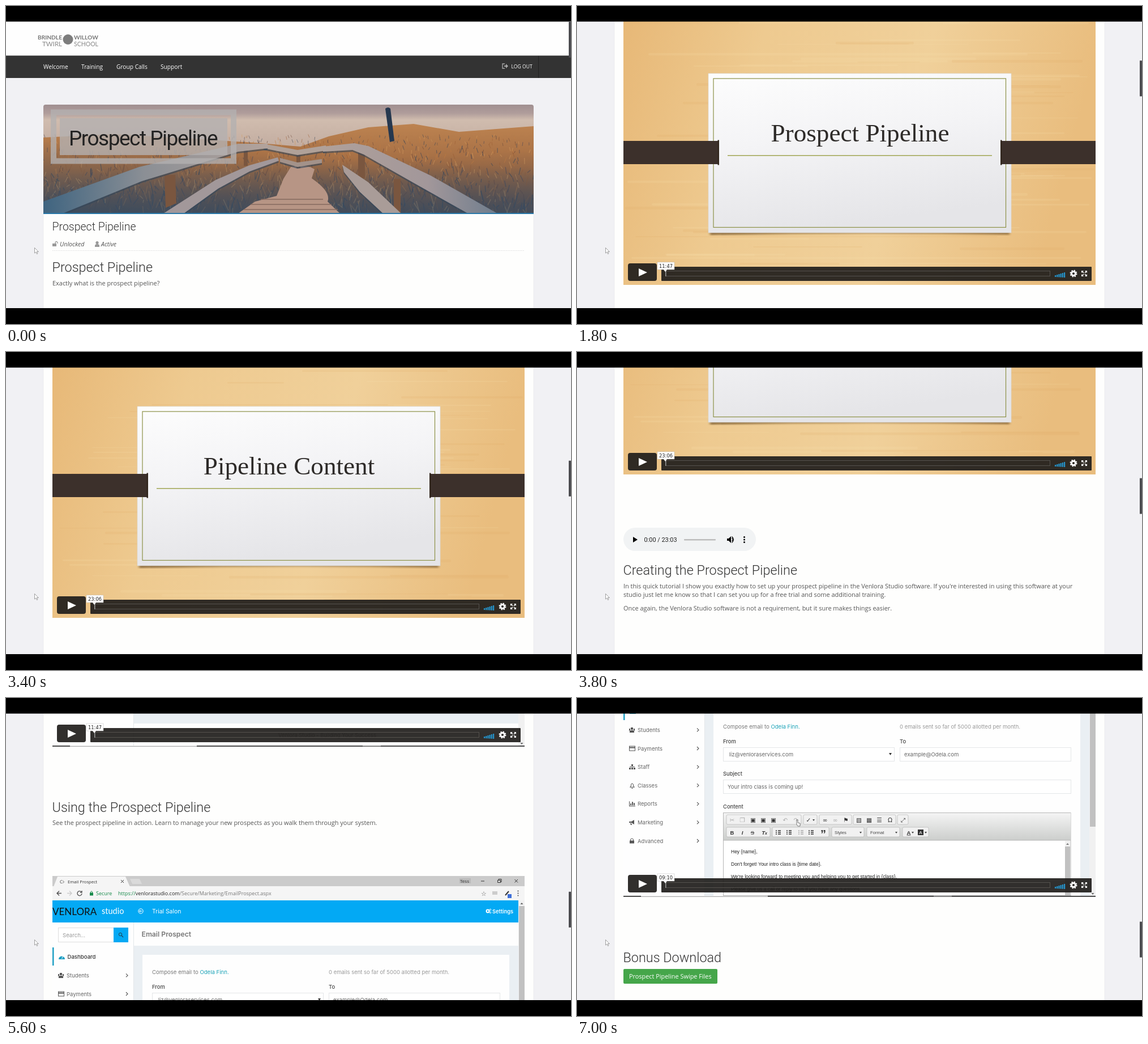
Recreate the animation shown at these times as an HTML page. Size 998 by 561 pixels, loop 7200 ms.

```html
<!DOCTYPE html>
<html lang="en">
<head>
<meta charset="utf-8">
<title>Course page scroll</title>
<style>
html, body { margin: 0; width: 100%; height: 100%; overflow: hidden; background: #000; }
svg { display: block; position: absolute; left: 0; top: 0; }
text { white-space: pre; }
</style>
</head>
<body>
<svg id="stage" width="998" height="561" viewBox="0 0 998 561"></svg>
<script>
const LOOP = 7200, STEP = 200;
const BODY = 'Open Sans', HEAD = 'Roboto', APP = 'Inter', SYMBOL = 'DejaVu Sans';

let seed = 7;
const random = (a, b) => {
  seed = (seed * 16807) % 2147483647;
  return a + (b - a) * seed / 2147483647;
};
const pick = list => list[Math.floor(random(0, list.length))];
const repeat = (n, make) => Array.from({ length: n }, (_, i) => make(i)).join('');

// SVG helpers
const rect = (x, y, w, h, fill, more = '') =>
  `<rect x="${x}" y="${y}" width="${w}" height="${h}" fill="${fill}" ${more}/>`;
const text = (x, y, str, size, fill, font = BODY, more = '') =>
  `<text x="${x}" y="${y}" font-size="${size}" fill="${fill}" font-family="${font}, sans-serif" ${more}>${str}</text>`;
const shape = (d, fill, more = '') => `<path d="${d}" fill="${fill}" ${more}/>`;
const line = (d, stroke, width = 1, more = '') =>
  `<path d="${d}" fill="none" stroke="${stroke}" stroke-width="${width}" ${more}/>`;
const circle = (x, y, r, fill, more = '') => `<circle cx="${x}" cy="${y}" r="${r}" fill="${fill}" ${more}/>`;
const at = (x, y, content) => `<g transform="translate(${x} ${y})">${content}</g>`;
const gradient = (id, stops, dir = 'x2="0" y2="1"') =>
  `<linearGradient id="${id}" ${dir}>${stops.map(([o, c]) => `<stop offset="${o}" stop-color="${c}"/>`).join('')}</linearGradient>`;

const heading = (y, str, size = 23.4) => text(81.5, y, str, size, '#333', HEAD, 'font-weight="300"');
const para = (y, str) => text(82, y, str, 10.95, '#555');

const defs = `<defs>
  ${gradient('sky', [[0, '#a08f90'], [.08, '#b09d9b'], [.14, '#d0bcae'], [.4, '#c2aca0'], [1, '#a88a78']])}
  ${gradient('grass', [[0, '#bd8350'], [.5, '#a06a42'], [1, '#6f4e40']])}
  ${gradient('shade', [[0, '#274c6b'], [1, '#274c6b00']], 'x1="0" y1="1" x2=".35" y2=".1"')}
  ${gradient('shadeRight', [[0, '#2d4a66'], [1, '#2d4a6600']], 'x1="1" y1="1" x2=".75" y2=".2"')}
  ${gradient('rail', [[0, '#3f6480'], [.45, '#8b8f95'], [1, '#b3a39c']], 'x2="1" y2="0"')}
  ${gradient('railRight', [[0, '#b0a19a'], [.6, '#a2979a'], [1, '#6f7d8d']], 'x2="1" y2="0"')}
  ${gradient('wood', [[0, '#e7b877'], [.3, '#eeca90'], [.65, '#f0d09a'], [1, '#e9bd7e']], 'x2="1" y2=".15"')}
  ${gradient('card', [[0, '#fdfdfd'], [.45, '#f4f4f6'], [1, '#e5e5e8']], 'x2=".25" y2="1"')}
  ${gradient('toolbar', [[0, '#f4f4f4'], [1, '#cccecc']])}
  <clipPath id="photoClip"><path d="M66 366V178q0-4 4-4H928q4 0 4 4V366Z"/></clipPath>
  <filter id="blur"><feGaussianBlur stdDeviation="2"/></filter>
</defs>`;

function photo() {
  const blades = repeat(1500, () => {
    const x = random(66, 932), y = random(232, 374), size = (y - 190) / 90;
    const tone = pick(['#d39a5e', '#9c5f36', '#4f4a55', '#c07c42', '#6f4b3c', '#3d4757']);
    return line(`M${x | 0} ${y | 0}l${random(-5 * size, 5 * size).toFixed(1)} ${random(-12 * size, -4).toFixed(1)}`,
      tone, (.6 + size * .6).toFixed(1), 'opacity=".6"');
  });
  const rail = (d, fill) => shape(d, '#33475a', 'transform="translate(0 3)" opacity=".6"') + shape(d, fill);
  return `<g clip-path="url(#photoClip)">` +
    rect(66, 174, 866, 192, 'url(#sky)') +
    shape('M66 232L190 226 330 234 450 242 520 248 570 230 640 214 720 208 800 222 932 212V366H66Z', 'url(#grass)') +
    blades +
    rect(66, 240, 866, 126, 'url(#shade)', 'opacity=".6"') +
    rect(66, 240, 866, 126, 'url(#shadeRight)', 'opacity=".45"') +
    shape('M503 284Q530 278 545 288L540 304Q575 328 568 345L590 366H410L440 345 478 335 490 305Z', '#b79585') +
    line('M432 350H575M420 359H586M450 341H560', '#85695f', 1.5) +
    shape('M670 181q5-4 9 0L686 238 678 240Z', '#26384f') +
    shape('M280 298H299L301 348 282 356ZM420 246H427V282H420ZM513 256H520V286H513ZM622 252H634V304H622ZM685 305H697V366H685Z', '#7a563f') +
    rail('M484 268L515 276 558 270V277L515 284 484 275Z', '#a3928a') +
    rail('M455 243L515 254 565 246V255L515 263 455 251Z', '#b0a199') +
    rail('M278 366L370 307 430 281 480 267 482 273 430 292 375 322 314 366Z', '#a2989a') +
    rail('M594 280L640 311 698 366H666L625 328 597 293Z', '#a99c98') +
    rail('M66 345L235 284 410 243H462V251L410 257 240 309 100 366H66Z', 'url(#rail)') +
    rail('M560 248L615 242 640 247 750 299 868 366H816L720 312 632 262 612 254 560 257Z', 'url(#railRight)') +
    rect(84, 187.5, 318, 86, 'none', 'stroke="#b4b1b1" stroke-opacity=".78" stroke-width="10"') +
    rect(95, 198, 296, 65, '#b4b1b1', 'opacity=".8"') +
    text(111, 246, 'Prospect Pipeline', 37, '#222', HEAD, 'letter-spacing="-1.5"') +
    `</g>` + rect(66, 365, 866, 2, '#2a78a8');
}

function header() {
  return rect(0, 27, 998, 61, '#fefefe') +
    circle(109.5, 59, 9, '#7d7d7d') +
    text(99, 58.5, 'BRINDLE', 10.2, '#777', 'Lato', 'font-weight="700" text-anchor="end"') +
    text(120, 58.5, 'WILLOW', 10.2, '#777', 'Lato', 'font-weight="700"') +
    text(99, 70.5, 'TWIRL', 11.5, '#888', 'Lato', 'text-anchor="end"') + text(120, 70.5, 'SCHOOL', 10.5, '#888', 'Lato') +
    rect(0, 87.5, 998, 39.5, '#333') + rect(940, 88, 1, 39, '#222') +
    [[66, 'Welcome'], [133, 'Training'], [195, 'Group Calls'], [273, 'Support']]
      .map(([x, s]) => text(x, 111, s, 10.2, '#fff')).join('') +
    line('M881 102h-4v8h4', '#aaa', 1.3) + shape('M880 105h3v-3l4 4-4 4v-3h-3Z', '#aaa') +
    text(892.5, 110, 'LOG OUT', 8.6, '#fff');
}

function status() {
  return heading(396, 'Prospect Pipeline', 19.5) +
    rect(82, 419, 7, 5, '#999') + line('M87 419v-2q2-3 4 0v2', '#999', 1.3) +
    text(95, 423.5, 'Unlocked', 10.7, '#555', BODY, 'font-style="italic"') +
    circle(161, 417.5, 2.6, '#999') + shape('M157 425v-2q0-3 4-3t4 3v2Z', '#999') +
    text(168, 423.5, 'Active', 10.7, '#555', BODY, 'font-style="italic"') +
    line('M82 431.5H916', '#e4e4e4', 1, 'stroke-dasharray="2 1"');
}

// Player bar, drawn relative to the bottom of its video
function controls(bottom, time) {
  const dark = 'rgba(32,30,28,.92)';
  return at(0, bottom,
    rect(90, -38, 51, 31, dark, 'rx="4"') + shape('M109-29L124-22 109-15Z', '#fff') +
    rect(149, -32, 760, 25, dark, 'rx="1"') + rect(156.5, -24.5, 679, 9, 'none', 'stroke="#55524e"') +
    rect(156, -25, 1.5, 10, '#999') +
    rect(142, -40, 30, 13, '#fff', 'stroke="#bbb" stroke-width=".5"') + shape('M153-27h6l-3 4Z', '#fff') +
    text(157, -30.5, time, 8.3, '#222', SYMBOL, 'text-anchor="middle"') +
    repeat(6, i => rect(844 + i * 3.2, -17 - i, 2.2, 3 + i * 1.2, '#2496cf')) +
    circle(877, -20, 3.6, 'none', 'stroke="#fff" stroke-width="3"') +
    circle(877, -20, 5.5, 'none', 'stroke="#fff" stroke-width="2" stroke-dasharray="2.3 2.02"') +
    shape('M891-25h4l-4 4ZM901-25v4l-4-4ZM891-15v-4l4 4ZM901-15h-4l4-4Z', '#fff') +
    line('M892-24l3 3M900-24l-3 3M892-16l3-3M900-16l-3-3', '#fff', 1.5));
}

function slide(top, title, time) {
  const grain = repeat(70, () => {
    const x = random(82, 720), w = random(100, 916 - x);
    return rect(x | 0, random(0, 464) | 0, w | 0, random(1, 5).toFixed(1),
      pick(['#dca55c', '#f7deb2']), 'opacity=".14" rx="2"');
  });
  const strap = (x, edge) => rect(x, 215, 168, 41, '#3c302b') + rect(edge, 213.5, 2.5, 44, '#33281f');
  return at(0, top,
    rect(82, 0, 834, 469, 'url(#wood)') + grain +
    shape('M235 372H764V380Q500 374 235 381Z', '#5b3d18', 'opacity=".7" filter="url(#blur)"') +
    rect(232, 96, 535, 281, 'url(#card)', 'stroke="#d9d6d0" stroke-width=".7"') +
    rect(241, 105, 516.5, 262.5, 'none', 'stroke="#8c9146" stroke-width="1.2"') +
    strap(82, 248.5) + strap(748, 748) +
    text(500, 216, title, 45.2, '#2d2a28', 'Liberation Serif', 'text-anchor="middle"').replace('sans-serif', 'serif') +
    rect(266, 240, 467, 1.5, '#a0a552')) + controls(top + 469, time);
}

function audio(y, length) {
  return at(0, y,
    rect(82, 0, 234, 41, '#f1f3f4', 'rx="20.5"') + shape('M99 16L107 21 99 26Z', '#000') +
    text(118.5, 24.7, '0:00 / ' + length, 10.9, '#222', HEAD) + rect(189, 20, 56, 2.4, '#bdbdbd', 'rx="1"') +
    shape('M265 19h3l4-4v12l-4-4h-3Z', '#000') + line('M273.500 18q3 3 0 6M273.500 15.500q6 5.500 0 11', '#000', 1.2) +
    [16.5, 21, 25.5].map(cy => circle(295.5, cy, 1.5, '#000')).join(''));
}

const MENU = [
  ['Students', 'M1 9v-4h8v4ZM3 0h4v4H3ZM0 2h2v4H0ZM8 2h2v4H8Z'],
  ['Payments', 'M0 0h11v9H0ZM1 1v1h9V1ZM1 4v4h9V4Z'],
  ['Staff', 'M4 0h3v3H4ZM0 6h3v3H0ZM4 6h3v3H4ZM8 6h3v3H8ZM5 3h1v3H5ZM1 4h9v1H1Z'],
  ['Classes', 'M1 8L3 5V3Q5-2 8 3V5L10 8ZM3 7H8L7 5V3Q5 0 4 3V5ZM4 9h3v1H4Z'],
  ['Reports', 'M0 0h1v8h10v1H0ZM2 4h2v3H2ZM5 1h2v6H5ZM8 3h2v4H8Z'],
  ['Marketing', 'M0 3h4l5-3v8l-5-3H0ZM2 6h2l1 3H3Z'],
  ['Advanced', 'M1 4h1V2Q5-2 8 2v2h1v5H1ZM3 4h4V2Q5 0 3 2Z']];

function emailForm() {
  const field = (x, y, w, str) => rect(x + .5, y + .5, w, 24, '#fff', 'stroke="#e4e6e8"') + text(x + 8, y + 16, str, 9.6, '#666', APP);
  const label = (x, y, str) => text(x, y, str, 9.4, '#444', APP, 'font-weight="500"');
  const group = (x, y, w) => rect(x, y, w, 17, '#f1f1f1', 'stroke="#b5b5b5" stroke-width=".7" rx="2"');
  const icons = [...'✂❐▣▣▣↶↷✓∞∞⚑▧▦☰Ω⤢'];
  const iconX = [274, 292, 311, 329, 347, 368, 387, 409, 438, 456, 475, 498, 516, 534, 553, 576];
  const faint = [0, 1, 5, 6, 9];
  const mark = (x, str, more = '') => text(x, 359.5, str, 9.5, '#333', 'Liberation Sans', 'text-anchor="middle" ' + more);
  const list = (x, color) => line(`M${x - 4} 353h2M${x - 4} 356h2M${x - 4} 359h2M${x} 353h5M${x} 356h5M${x} 359h5`, color, 1.4);
  const letter = (y, str) => text(272, y, str, 8.5, '#222', 'Liberation Sans');
  return text(258, 173, 'Compose email to <tspan fill="#1ba3b8">Odela Finn.</tspan>', 9.6, '#777', APP) +
    text(570, 173, '0 emails sent so far of 5000 allotted per month.', 9.5, '#999', APP) +
    label(258, 198.5, 'From') + label(570, 198.5, 'To') +
    field(258, 206, 302, ' liz@venloraservices.com') + shape('M551 216h5l-2.500 4Z', '#333') +
    field(570, 206, 302, 'example@Odela.com') +
    label(258, 256, 'Subject') + field(258, 263, 614, 'Your intro class is coming up!') +
    label(258, 314, 'Content') +
    rect(258.5, 321.5, 613.5, 146, '#fff', 'stroke="#b6b6b6"') + rect(259, 322, 613, 48, 'url(#toolbar)') +
    rect(258, 369.5, 614, 1, '#b6b6b6') +
    [[264, 132], [400, 24], [428, 57], [488, 75], [566, 19]].map(([x, w]) => group(x, 325, w)).join('') +
    [[264, 77], [345, 100], [450, 57], [512, 58], [575, 46]].map(([x, w]) => group(x, 347, w)).join('') +
    icons.map((c, i) => text(iconX[i], 337.5, c, 10.5, faint.includes(i) ? '#aaa' : '#333', SYMBOL, 'text-anchor="middle"')).join('') +
    mark(274, 'B', 'font-weight="700"') + mark(292, 'I', 'font-style="italic" font-weight="700"') +
    mark(310, 'S', 'text-decoration="line-through"') + mark(331, 'T<tspan font-size="7">x</tspan>', 'font-style="italic" font-weight="700"') +
    list(355, '#333') + list(374, '#333') + list(395, '#aaa') + list(413, '#333') +
    text(435, 366, '”', 20, '#333', 'Liberation Sans', 'text-anchor="middle" font-weight="700"') +
    text(455, 359, 'Styles', 7.7, '#444', 'Liberation Sans') + text(518, 359, 'Format', 7.7, '#444', 'Liberation Sans') +
    mark(586, 'A', 'font-weight="700" text-decoration="underline"') + rect(602, 351, 10, 10, '#333') +
    text(607, 359, 'A', 8, '#fff', 'Liberation Sans', 'text-anchor="middle"') +
    [[416, 333], [499, 355], [562, 355], [591, 355], [614, 355]].map(([x, y]) => shape(`M${x} ${y}h4l-2 3Z`, '#444')).join('') +
    shape('M388 334v8l2 3h4v-5l-4-1v-5Z', '#fff', 'stroke="#444" stroke-width=".7"') +
    letter(393, 'Hey {name},') + letter(415, `Don't forget! Your intro class is {time date}.`) +
    letter(437, `We're looking forward to meeting you and helping you to get started in {class}.`) +
    letter(459, 'Please give us a call or reply to us if you have any questions.') +
    rect(862, 371, 9, 97, '#f1f1f1') + rect(862, 381, 9, 87, '#c1c1c1') + shape('M864 378h5l-2.500-3Z', '#777');
}

function pipelineBoard() {
  return repeat(4, i => at(258 + i * 156, 160,
    rect(0, 0, 142, 22, '#03a9f4') + text(8, 15, ['New', 'Contacted', 'Intro Class', 'Enrolled'][i], 9.4, '#fff', APP) +
    repeat(4 - i, k => rect(.5, 30.5 + k * 42, 141, 34, '#fff', 'stroke="#e0e4e7"') + text(8, 51 + k * 42, 'Prospect ' + (k + 1), 9.4, '#777', APP)))) +
    rect(226, 380, 679, 50, '#eaeff3') + rect(226, 429, 679, 40, '#fefefe') +
    text(481, 453, 'Venlora Studio - Building Your Success', 9.4, '#888', APP);
}

// Screen recording of a browser window
function browser(top, title, path, content, time) {
  const menu = MENU.map(([name, icon], i) => at(0, 175.4 + i * 32.6,
    at(92, -4.5, shape(icon, '#555', 'fill-rule="evenodd"')) + text(107, 3.5, name, 9.5, '#666', APP) +
    line('M212-3l3 3-3 3', '#555', 1.1))).join('');
  return at(0, top,
    rect(82, 0, 834, 469, '#fefefe') + rect(82, 0, 834, 19, '#cbcbcb') +
    shape('M84 19L91 1H211L219 19Z', '#f5f5f5') + shape('M219 5h17l4 9h-17Z', '#dadada') +
    text(95, 12.5, 'C⊦', 7.5, '#444', SYMBOL) + text(109, 12.5, title, 7.6, '#333', BODY) +
    line('M203 7l5 5M208 7l-5 5M839 9h6M868.500 7.500h5v4h-5ZM870 7V5.500h5v5h-1M898.500 6l5.500 5.500M904 6l-5.500 5.500', '#333') +
    rect(801, 4, 20, 9, '#bbb') + text(802, 12, 'Tess', 8, '#333', BODY) +
    rect(82, 18, 834, 25, '#f5f5f5') +
    line('M98 30.500H90M94 26.500l-4 4 4 4M133 28a4 4 0 1 0 1 3M134 26v3h-3', '#555', 1.4) +
    line('M108 30.500h8M112 26.500l4 4-4 4', '#ccc', 1.4) +
    rect(148, 29.5, 6, 5, '#178a4b') + line('M149.500 30v-2q1.500-2.500 3 0v2', '#178a4b') +
    text(159, 34, 'Secure', 9, '#178a4b') +
    text(198, 34, `<tspan fill="#178a4b">https://</tspan>venlorastudio.com<tspan fill="#777">${path}</tspan>`, 9, '#222') +
    text(839, 34.5, '☆', 11, '#555', SYMBOL) + rect(859, 27, 9, 6, '#ccc') +
    line('M882 34l6-7', '#333', 2) + rect(886, 32, 7, 7, '#3f6fd8') +
    [26.5, 30.5, 34.5].map(y => circle(904.5, y, 1.1, '#555')).join('') +
    rect(82, 43, 823, 39, '#03a9f4') +
    text(82, 68.5, 'VENLORA', 17, '#111', 'Lato') + text(169, 67, 'studio', 14.5, '#fff', 'Lato') +
    circle(238, 62, 4.2, 'none', 'stroke="#fff"') + line('M240.500 62h-5M237.500 60l-2 2 2 2', '#fff') +
    text(258, 65.5, 'Trial Salon', 10.4, '#fff', APP) +
    circle(851, 62, 2.4, 'none', 'stroke="#fff" stroke-width="2"') + circle(855.5, 59.5, 1.3, 'none', 'stroke="#fff"') +
    circle(855.5, 64.5, 1.3, 'none', 'stroke="#fff"') + text(859, 65.5, 'Settings', 9.3, '#fff', APP, 'font-weight="600"') +
    rect(92.5, 91.5, 98, 25, '#fff', 'stroke="#ddd"') + text(100, 107.5, 'Search...', 9.6, '#999', APP) +
    rect(190, 91, 26, 26, '#03a9f4') + circle(202, 103, 2.7, 'none', 'stroke="#245"') + line('M204 105l3 3', '#245', 1.3) +
    rect(82, 126, 2.5, 32, '#1e9fc4') + shape('M93 147a5.500 5.500 0 1 1 11 0Z', '#1e9fc4') + line('M98.500 146l2-4', '#fff') +
    text(108.5, 146, 'Dashboard', 9.6, '#333', APP, 'font-weight="500"') + menu +
    rect(226, 123, 679, 346, '#eaeff3') + rect(225, 82, 1, 387, '#e3e7ea') +
    text(239.5, 107, title, 12.2, '#777', APP, 'font-weight="600"') +
    rect(241, 139, 648, 330, '#fefefe') + content +
    rect(905, 43, 11, 426, '#f1f1f1') + rect(906, 53, 10, 293, '#c1c1c1') +
    shape('M908.500 50h5l-2.500-3ZM908.500 463h5l-2.500 3Z', '#666') +
    rect(82, 468, 834, 1.6, '#222') + rect(113, 468, 224, 1.6, '#ddd') + rect(630, 468, 32, 1.6, '#888')) +
    controls(top + 469, time);
}

const page = rect(0, 27, 998, 3900, '#f1f1f4') + header() +
  rect(66, 366, 866, 3500, '#fefefd', 'stroke="#e8e8ea" stroke-width=".6"') + photo() + status() +
  heading(469, 'Prospect Pipeline') + para(493, 'Exactly what is the prospect pipeline?') +
  slide(583, 'Prospect Pipeline', '11:47') + audio(1146, '11:44') +
  heading(1229, 'Pipeline Content') + para(1253, 'What should my prospect pipeline contain?') +
  slide(1342, 'Pipeline Content', '23:06') + audio(1905, '23:03') +
  heading(1988, 'Creating the Prospect Pipeline') +
  para(2011.5, `In this quick tutorial I show you exactly how to set up your prospect pipeline in the Venlora Studio software. If you're interested in using this software at your`) +
  para(2027, 'studio just let me know so that I can set you up for a free trial and some additional training.') +
  para(2050.5, 'Once again, the Venlora Studio software is not a requirement, but it sure makes things easier.') +
  browser(2188, 'Prospect Pipeline', '/Secure/Marketing/Pipeline.aspx', pipelineBoard(), '11:47') +
  heading(2773, 'Using the Prospect Pipeline') +
  para(2796, 'See the prospect pipeline in action. Learn to manage your new prospects as you walk them through your system.') +
  browser(2886, 'Email Prospect', '/Secure/Marketing/EmailProspect.aspx', emailForm(), '09:10') +
  heading(3471, 'Bonus Download') + rect(82, 3483, 166, 26, '#45a64a', 'rx="2"') +
  text(92, 3500, 'Prospect Pipeline Swipe Files', 10.9, '#fff');

document.getElementById('stage').innerHTML = defs + `<g id="page">${page}</g>` +
  rect(994, 28, 4, 63, '#4a4a4e', 'id="thumb"') +
  shape('M50.500 426.500v9.500l2.300-2 1.700 3.500 1.500-.800-1.600-3.200h3Z', '#fff', 'stroke="#888" stroke-width=".8"') +
  rect(0, 0, 998, 27.5, '#000') + rect(0, 533, 998, 28, '#000');

const pageNode = document.getElementById('page'), thumb = document.getElementById('thumb');

// Scroll offset in px at times in ms, joined by a smooth curve
const KEYS = [[0, 0], [800, 200], [1800, 560], [2800, 970], [3800, 1595], [5600, 2572], [7000, 3005]];

function slope(i) {
  const [t0, y0] = KEYS[Math.max(i - 1, 0)], [t1, y1] = KEYS[Math.min(i + 1, KEYS.length - 1)];
  return (y1 - y0) / (t1 - t0);
}

function scrollAt(t) {
  let i = 0;
  while (i < KEYS.length - 2 && t > KEYS[i + 1][0]) i++;
  const [t0, y0] = KEYS[i], [t1, y1] = KEYS[i + 1], span = t1 - t0, u = (t - t0) / span;
  const ease = u * u * (3 - 2 * u);
  return y0 + (y1 - y0) * ease + span * u * (1 - u) * ((1 - u) * slope(i) - u * slope(i + 1));
}

function draw() {
  const t = Math.floor(performance.now() % LOOP / STEP) * STEP;
  const scroll = Math.round(scrollAt(t));
  pageNode.setAttribute('transform', `translate(0 ${-scroll})`);
  thumb.setAttribute('y', 28 + scroll * .122);
  requestAnimationFrame(draw);
}
draw();
</script>
</body>
</html>
```
